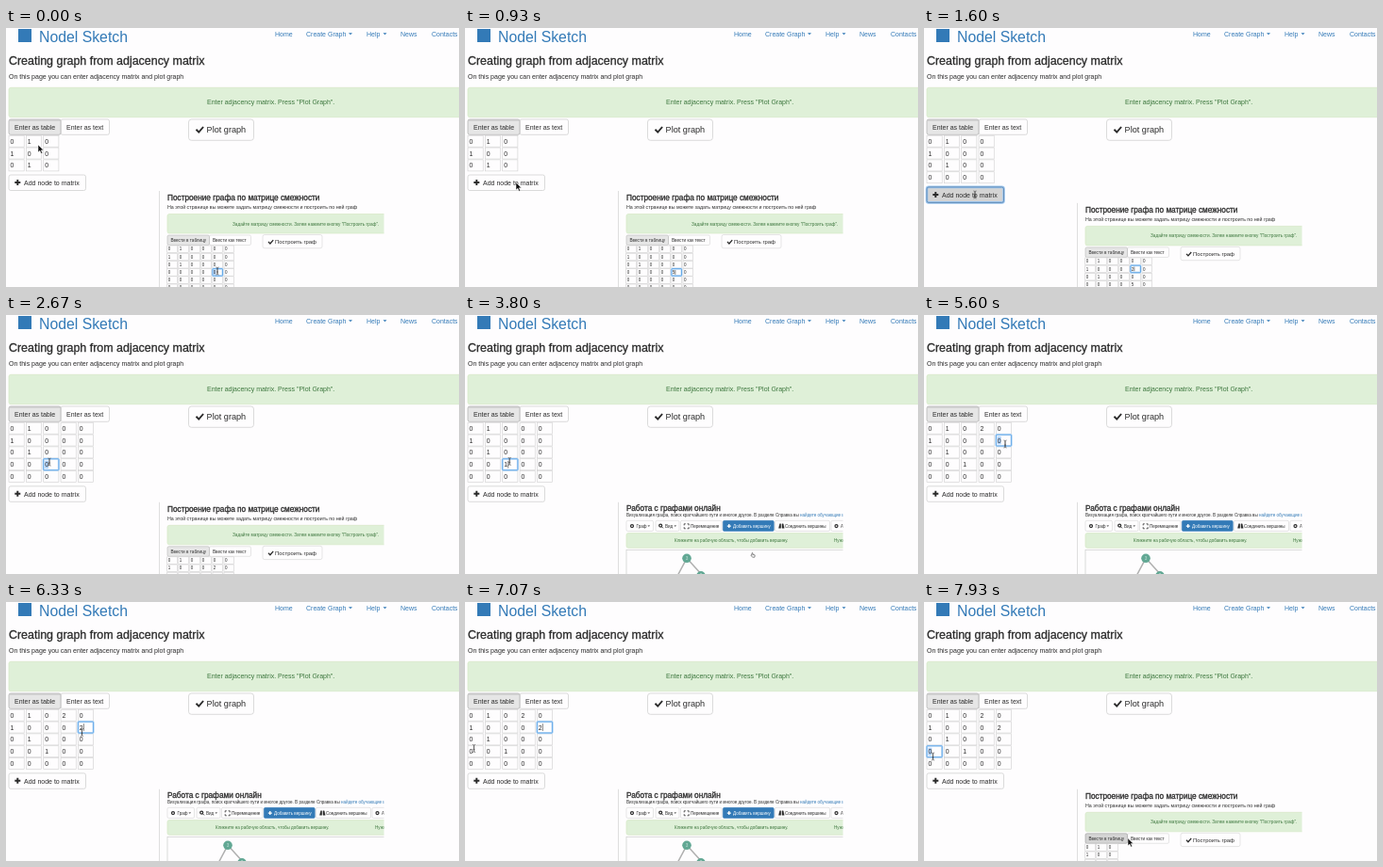
An HTML page that plays this animation: 480x275 px, repeating every 8000 ms.

```html
<!DOCTYPE html>
<html lang="en">
<head>
<meta charset="utf-8">
<title>Adjacency matrix editor</title>
<style>
  html, body { margin: 0; width: 100%; height: 100%; overflow: hidden; background: #fefdfe; }
  svg { display: block; width: 100vw; height: 100vh; font-family: "Liberation Sans", Arial, sans-serif; }
</style>
</head>
<body>
<svg id="stage" viewBox="0 0 480 275"></svg>
<script>
const LOOP = 8000;
const INK = '#2b2b2b', BLUE = '#337ab7', GREEN = '#3c763d', PAPER = '#fefdfe';
const stage = document.getElementById('stage');

// Main matrix: [time, value] steps, edits as [time, row, column, value].
const sizeSteps = [[0, 3], [1100, 4], [1900, 5]];
const edits = [[0, 0, 1, 1], [0, 1, 0, 1], [0, 2, 1, 1],
  [3200, 3, 2, 1], [5000, 0, 3, 2], [6000, 1, 4, 2]];
const focusSteps = [[0, ''], [1100, 'add'], [2450, '3,2'], [4300, '0,3'], [5450, '1,4'], [7500, '3,0']];
const pointerPath = [[0, 34, 124], [800, 54, 164], [1150, 54, 164], [1500, 54, 177], [1950, 54, 177],
  [2500, 46, 156], [3700, 46, 158], [4300, 62, 123], [5050, 62, 123], [5500, 86, 137],
  [6200, 86, 137], [7000, 9.5, 155], [7500, 9.5, 164]];

// Small demo in the corner.
const demoPages = [[0, 'matrix'], [3800, 'graph'], [7500, 'restart']];
const demoEdits = [...edits.slice(0, 3), [700, 3, 4, 5], [1400, 1, 4, 2]];
const demoFocus = [[0, '3,4'], [1200, '1,4'], [2300, '']];
const demoPointer = [[0, 224, 85], [700, 224, 85], [1200, 224, 69], [2750, 224, 69], [3450, 304, 54],
  [3800, 304, 54], [4400, 305, 55], [7500, 240, 62], [7850, 216, 52]];

const stepAt = (steps, t) => steps.filter(s => s[0] <= t).pop()[1];

function pointAt(path, t) {
  const i = path.findIndex(p => p[0] > t);
  if (i < 0) return path[path.length - 1].slice(1);
  const [t0, x0, y0] = path[i - 1], [t1, x1, y1] = path[i];
  const u = (t - t0) / (t1 - t0), e = u * u * (3 - 2 * u);
  return [x0 + (x1 - x0) * e, y0 + (y1 - y0) * e].map(v => +v.toFixed(1));
}

const text = (x, y, size, str, fill = INK, extra = '') =>
  `<text x="${x}" y="${y}" font-size="${size}" fill="${fill}" ${extra}>${str}</text>`;
const heading = (x, y, size, str) => text(x, y, size, str, INK, `stroke="${INK}" stroke-width=".3"`);
const rect = (x, y, w, h, fill = PAPER, stroke = '#ccc', r = 0, line = .7) =>
  `<rect x="${x}" y="${y}" width="${w}" height="${h}" rx="${r}" fill="${fill}" stroke="${stroke}" stroke-width="${line}"/>`;
const path = (d, stroke, width, fill = 'none') =>
  `<path d="${d}" stroke="${stroke}" stroke-width="${width}" fill="${fill}"/>`;
const alertBox = (x, y, w, h) => rect(x, y, w, h, '#dff0d8', '#d6e9c6', 2);
const caretDown = (x, y, s, fill) => path(`M${x} ${y}h${2 * s}l${-s} ${s}z`, 'none', 0, fill);
const check = (x, y, s) => path(`M${x} ${y}l${.35 * s} ${.35 * s}l${.6 * s} ${-.7 * s}`, INK, .24 * s);
const plus = (x, y, s, color = INK) => path(`M${x - s} ${y}h${2 * s}M${x} ${y - s}v${2 * s}`, color, .65 * s);
const gear = (x, y) => `<circle cx="${x}" cy="${y}" r="1.5" fill="none" stroke="${INK}" stroke-width="1.2"/>`;

const cursors = {
  arrow: (x, y) => path(`M${x} ${y}v8l1.9-1.7 1.3 3 1.4-.6-1.3-2.9h2.5z`, '#fff', .5, '#111'),
  beam: (x, y) => path(`M${x - 1.6} ${y - 4}q1.6 0 1.6 1v6q0 1-1.6 1M${x + 1.6} ${y - 4}q-1.6 0-1.6 1v6q0 1 1.6 1M${x - 1} ${y + 1}h2`, '#333', .55),
  hand: (x, y) => path(`M${x} ${y}q.7-.7 1 .2v1.3l2.2.6-.3 2.3h-2.3l-1.7-2.1.6-.4.5.5z`, '#444', .6, '#fff')
};

function matrix({ x, y, rows, cols, dx, dy, w, h, size, edits, focus, t }) {
  let out = '', ring = '';
  for (let r = 0; r < rows; r++) for (let c = 0; c < cols; c++) {
    const edit = edits.filter(e => e[0] <= t && e[1] === r && e[2] === c).pop();
    const cx = +(x + c * dx).toFixed(2), cy = +(y + r * dy).toFixed(2), tx = cx + w * .09;
    out += rect(cx, cy, w, h, PAPER, '#cfcfcf', 0, .6);
    if (focus === `${r},${c}`) {
      ring = rect(cx, cy, w, h, 'none', '#c4dff7', 1, 2.2) + rect(cx, cy, w, h, 'none', '#66a9e8', .5, 1);
      // An untouched value is selected; a typed one is followed by the caret.
      out += edit ? path(`M${tx + size * .66} ${cy + h * .18}v${h * .64}`, '#333', .6)
        : rect(tx, cy + h * .16, size * .56, h * .7, '#b3d4fc', 'none');
    }
    out += text(tx, cy + h * .5 + size * .36, size, edit ? edit[3] : 0);
  }
  return out + ring;
}

function header() {
  const nav = [[285, 'Home'], [318, 'Create Graph', 363], [382, 'Help', 399.5], [418, 'News'], [451, 'Contacts']];
  return rect(13, 1, 14, 14, BLUE, 'none') + text(35, 15, 15.8, 'Nodel Sketch', BLUE) +
    nav.map(([x, label, caret]) => text(x, 8.6, 7, label, BLUE) + (caret ? caretDown(caret, 5.2, 2, BLUE) : '')).join('') +
    heading(3, 39, 12.45, 'Creating graph from adjacency matrix') +
    text(3, 53.5, 7, 'On this page you can enter adjacency matrix and plot graph') +
    alertBox(3, 63.3, 490, 31.4) +
    text(213, 81, 7, 'Enter adjacency matrix. Press "Plot Graph".', GREEN) +
    rect(58, 97, 51.5, 16.3, PAPER, '#ccc', 2) + text(64, 107.7, 7, 'Enter as text') +
    rect(3, 97, 55, 16.3, '#e6e6e6', '#adadad', 2) + path('M4 98h53', '#c4c4c4', 1.2) +
    text(9, 107.7, 7, 'Enter as table') +
    rect(193.5, 97, 69, 22.3, PAPER, '#ccc', 3) + check(201.5, 107.8, 8) + text(212.6, 111.2, 9.15, 'Plot graph');
}

function addButton(y, focused) {
  const box = focused
    ? rect(3, y, 81.5, 16.5, '#d4d4d4', '#9cc6f0', 2, 2.6) + rect(3, y, 81.5, 16.5, 'none', '#5f87ae', 2, .9)
    : rect(3, y, 81.5, 16.5, PAPER, '#ccc', 2);
  return box + plus(12.3, y + 8, 3) + text(19, y + 10.8, 7, 'Add node to matrix');
}

function demoMatrix(t, restarted) {
  const hover = !restarted && t > 3450;
  return heading(171, 10, 8.25, 'Построение графа по матрице смежности') +
    text(171, 18.8, 5.3, 'На этой странице вы можете задать матрицу смежности и построить по ней граф') +
    alertBox(171, 24.5, 240, 20.5) +
    text(240, 36.6, 4.71, 'Задайте матрицу смежности. Затем нажмите кнопку "Построить граф".', GREEN) +
    rect(215.5, 47, 44, 10.5, PAPER, '#ccc', 1.5, .5) + text(219, 54, 4.66, 'Ввести как текст') +
    rect(171, 47, 44.5, 10.5, restarted ? '#d4d4d4' : '#e6e6e6', restarted ? '#8c8c8c' : '#adadad', 1.5, .5) +
    text(174.5, 54, 4.66, 'Ввести в таблицу') +
    rect(272, 46.5, 63, 14.3, hover ? '#e6e6e6' : PAPER, hover ? '#adadad' : '#ccc', 2, .5) +
    check(278, 54, 5.5) + text(285, 55.8, 5.9, 'Построить граф') +
    matrix({ x: 170.7, y: 58, rows: restarted ? 3 : 6, cols: restarted ? 3 : 6, dx: 12.05, dy: 8.2, w: 10.6, h: 7.6,
      size: 4.5, edits: restarted ? edits.slice(0, 3) : demoEdits, focus: restarted ? '' : stepAt(demoFocus, t), t });
}

function demoGraph() {
  const button = (x, w, label, tx, fill = PAPER, ink = INK) =>
    rect(x, 19.5, w, 11.2, fill, fill === PAPER ? '#ccc' : fill, 1.5, .5) + text(tx, 27, 4.55, label, ink);
  const node = (x, y, label) => `<circle cx="${x}" cy="${y}" r="4.8" fill="#62a894"/>` +
    text(x, y + 1.6, 4.6, label, '#c4e2da', 'text-anchor="middle"');
  return heading(171, 9.3, 8.25, 'Работа с графами онлайн') +
    text(171, 15.6, 4.57, `Визуализация графа, поиск кратчайшего пути и многое другое. В разделе Справка вы <tspan fill="${BLUE}">найдете обучающие материалы</tspan>`) +
    button(171, 28.5, 'Граф', 181.5) + gear(177, 25.3) + caretDown(193.5, 24.7, 1.3, INK) +
    button(202, 25, 'Вид', 212) + gear(207.2, 24.8) + path('M208.3 25.9l1.6 1.6', INK, 1) + caretDown(221.5, 24.7, 1.3, INK) +
    button(228.5, 43.5, 'Перемещение', 239) +
    path('M232.2 24.6v-1.6h1.6m1.8 0h1.6v1.6m0 1.8v1.6h-1.6m-1.8 0h-1.6v-1.6', INK, .8) +
    button(273.3, 54, 'Добавить вершину', 284, BLUE, '#fff') + plus(279.8, 25.3, 2, '#fff') +
    button(328.5, 58, 'Соединить вершины', 339) + path('M333.5 23l1.2 0v4.5h-2.2zM336 23h1.2l1 4.5h-2.2z', INK, .4, INK) +
    button(388, 30, 'Алгоритмы', 398) + gear(393.5, 25.3) +
    alertBox(171, 32.8, 240, 15.7) +
    text(222, 42.2, 4.57, 'Кликните на рабочую область, чтобы добавить вершину.', GREEN) +
    text(391, 42.2, 4.57, 'Нужно', GREEN) +
    rect(171, 50.5, 240, 60, 'none', '#ccc', 0, .7) +
    path('M235 59.5L222 84M235 59.5L250 76', '#b0b0b0', 1.5) + node(235, 59.5, 3) + node(250, 78, 2);
}

function demo(t, top) {
  const page = stepAt(demoPages, t), [x, y] = pointAt(demoPointer, t);
  let cursor = '';
  if (page === 'graph') cursor = t < 5000 ? cursors.hand(x, y) : '';
  else if (page === 'restart' || t > 2750) cursor = cursors.arrow(x, y);
  else if (t < 650) cursor = cursors.beam(x, y);
  return `<g clip-path="url(#demoClip)"><g transform="translate(0 ${top})">` +
    path('M162.5 0V110', '#d0d0d0', .7) +
    (page === 'graph' ? demoGraph() : demoMatrix(t, page === 'restart')) + cursor + '</g></g>';
}

function scene(t) {
  const n = stepAt(sizeSteps, t), focus = stepAt(focusSteps, t);
  const buttonY = +(156 + (n - 3) * 12.9).toFixed(1);
  const [x, y] = pointAt(pointerPath, t);
  const overButton = t < 1150 || (t > 1700 && t < 2050);
  return '<defs><clipPath id="demoClip"><path d="M162 0H400.5V275H162z"/></clipPath></defs>' +
    rect(0, 0, 480, 275, PAPER, 'none') + header() +
    matrix({ x: 3, y: 114.2, rows: n, cols: n, dx: 18.35, dy: 12.85, w: 16.2, h: 12, size: 6.9, edits, focus, t }) +
    addButton(buttonY, focus === 'add') +
    demo(t, buttonY + 17) +
    (overButton ? cursors.arrow : cursors.beam)(x, y);
}

let shown = '';
function render(now) {
  const markup = scene(now % LOOP);
  if (markup !== shown) stage.innerHTML = shown = markup;
  requestAnimationFrame(render);
}
render(performance.now());
</script>
</body>
</html>
```
